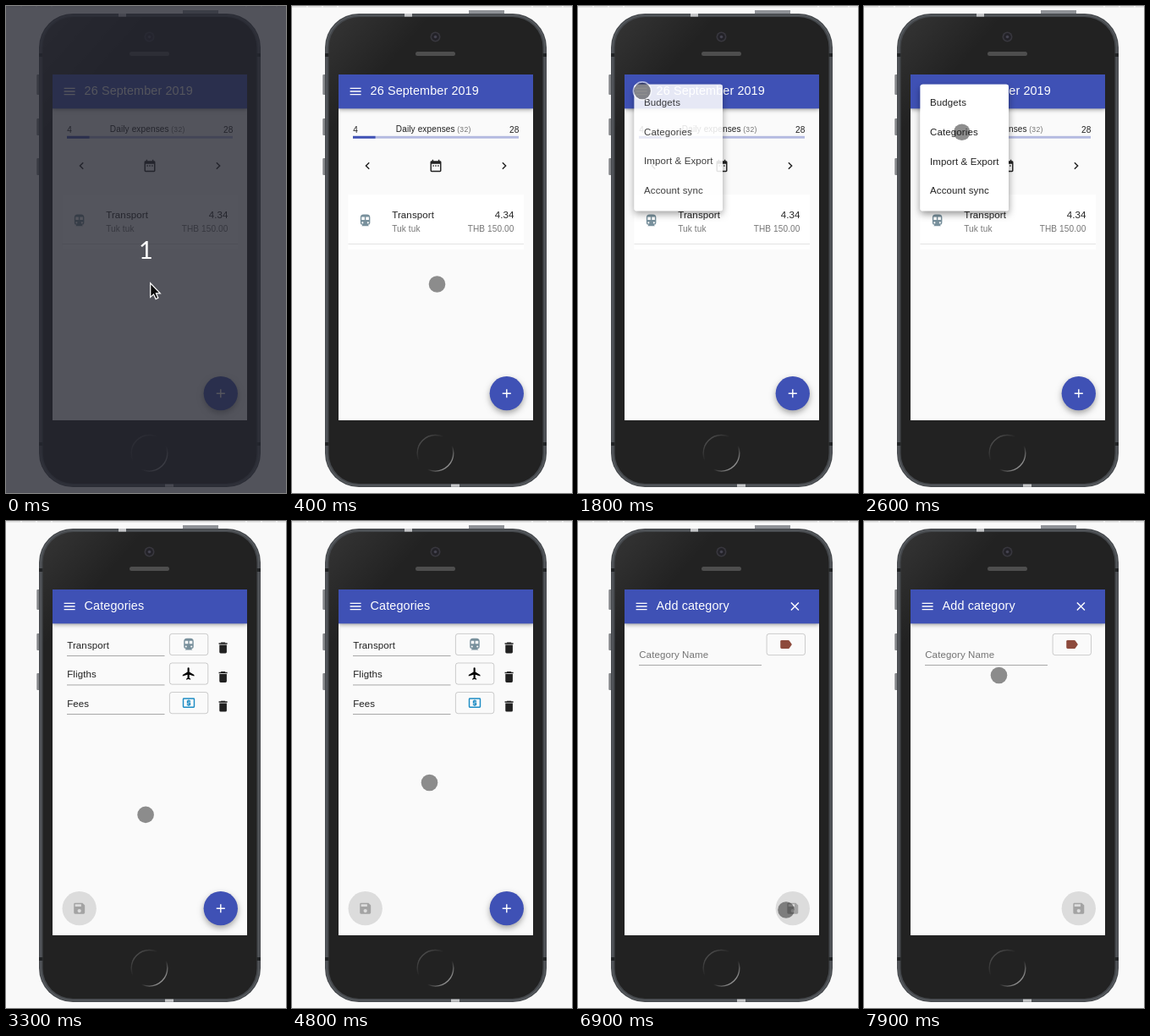
These frames come from a looping animation (331x576 px, 8 s). An HTML page with a canvas:

```html
<!DOCTYPE html>
<html lang="en">
<head>
<meta charset="utf-8">
<title>Expense app demo</title>
<style>
html, body { margin: 0; width: 100%; height: 100%; overflow: hidden; background: #f9f9f9; }
canvas { display: block; width: 331px; height: 576px; }
</style>
</head>
<body>
<canvas id="stage"></canvas>
<script>
const W = 331, H = 576, LOOP = 8000, STEP = 100;
const K = 0.72;       // app zoom on the stage
const ROW = 48 * K;   // list row pitch
const FAB = 28 * K;   // round button radius
const LEFT = 86.7, RIGHT = 253.8, BOTTOM = 458.2;
const canvas = document.getElementById('stage');
const ctx = canvas.getContext('2d');
const dpr = window.devicePixelRatio || 1;
canvas.width = W * dpr;
canvas.height = H * dpr;

const BLUE = '#3f51b5', INK = 'rgba(0,0,0,.87)', SOFT = 'rgba(0,0,0,.54)';
const FONT = '"Liberation Sans", Arial, sans-serif';

// Icons live on a 24 unit grid; line icons are stroked, the others filled.
const line = d => ({ path: new Path2D(d), stroked: true });
const solid = build => {
  const path = new Path2D();
  build(path);
  return { path };
};

const icons = {
  menu: line('M3 7h18M3 12h18M3 17h18'),
  plus: line('M5 12h14M12 5v14'),
  close: line('M5.7 5.7l12.6 12.6M18.3 5.7L5.7 18.3'),
  prev: line('M14.7 6.7L9.4 12l5.3 5.3'),
  next: line('M9.3 6.7l5.3 5.3-5.3 5.3'),
  date: solid(p => {
    p.roundRect(3, 4, 18, 18, 2);
    p.rect(5, 9, 14, 11);
    for (const x of [6, 16]) p.rect(x, 2, 2, 2);
    for (const x of [7, 11, 15]) p.rect(x, 11, 2, 2);
  }),
  tram: solid(p => {
    p.roundRect(4, 2, 16, 17, [5, 5, 3.5, 3.5]);
    for (const x of [6, 13]) p.rect(x, 6, 5, 5);
    for (const x of [7.5, 16.5]) {
      p.moveTo(x + 1.5, 15.5);
      p.arc(x, 15.5, 1.5, 0, 7);
    }
    p.addPath(new Path2D('M7.5 19h9l1.5 2H6z'));
  }),
  plane: solid(p => {
    const half = new Path2D('M11.5 2q1.5 0 1.5 1.5V9l8 5v2l-8-2.5V19l2 1.5V22l-3.5-1z');
    p.addPath(half);
    p.addPath(half, new DOMMatrix([-1, 0, 0, 1, 23, 0]));
  }),
  cash: solid(p => {
    p.roundRect(2, 4, 20, 16, 2);
    p.rect(4, 6, 16, 12);
    p.addPath(new Path2D('M11 7h2v1h2v2h-4v1h4v5h-2v1h-2v-1H9v-2h4v-1H9V8h2z'));
  }),
  trash: solid(p => {
    p.roundRect(6, 7, 12, 14, [0, 0, 2, 2]);
    p.rect(5, 4, 14, 2);
    p.rect(8.5, 3, 7, 1);
  }),
  save: solid(p => {
    p.addPath(new Path2D('M5 3h12l4 4v12q0 2-2 2H5q-2 0-2-2V5q0-2 2-2z'));
    p.rect(5, 5, 10, 4);
    p.moveTo(15, 16);
    p.arc(12, 16, 3, 0, 7);
  }),
  label: solid(p => p.addPath(new Path2D('M5 5h11q1 0 1.6.8L22 12l-4.4 6.2q-.6.8-1.6.8H5q-2 0-2-2V7q0-2 2-2z')))
};

// Touch pointer: each move starts at a time, lasts a while and ends at x, y.
const home = { x: 171.5, y: 329 };
const moves = [
  { at: 400, ms: 100, x: 97, y: 146 },
  { at: 600, ms: 400, x: 76, y: 87 },
  { at: 1100, ms: 400, x: 76, y: 100.5 },
  { at: 1900, ms: 700, x: 115.7, y: 149.3 },
  { at: 3100, ms: 300, x: 167, y: 355 },
  { at: 4700, ms: 100, x: 162.5, y: 309.5 },
  { at: 5100, ms: 200, x: 227, y: 178 },
  { at: 5700, ms: 200, x: 257, y: 186 },
  { at: 5900, ms: 300, x: 83, y: 467 },
  { at: 6300, ms: 200, x: 246, y: 460 },
  { at: 7100, ms: 100, x: 215, y: 402 },
  { at: 7300, ms: 100, x: 195.5, y: 301 },
  { at: 7600, ms: 300, x: 159.5, y: 182.5 }
];

const easeOut = p => 1 - (1 - p) ** 3;

function pointerAt(t) {
  let { x, y } = home;
  for (const m of moves) {
    if (t < m.at) break;
    const p = easeOut(Math.min(1, (t - m.at) / m.ms));
    x += (m.x - x) * p;
    y += (m.y - y) * p;
  }
  return [x, y];
}

function rect(x, y, w, h, color) {
  ctx.fillStyle = color;
  ctx.fillRect(x, y, w, h);
}

function round(x, y, w, h, r, fill, stroke, width = 1) {
  ctx.beginPath();
  ctx.roundRect(x, y, w, h, r);
  if (fill) { ctx.fillStyle = fill; ctx.fill(); }
  if (stroke) { ctx.strokeStyle = stroke; ctx.lineWidth = width; ctx.stroke(); }
}

function disc(x, y, r, fill) {
  round(x - r, y - r, 2 * r, 2 * r, r, fill);
}

function ring(x, y, r, stroke, width) {
  round(x - r, y - r, 2 * r, 2 * r, r, null, stroke, width);
}

function gradient(x0, y0, x1, y1, ...colors) {
  const g = ctx.createLinearGradient(x0, y0, x1, y1);
  colors.forEach((c, i) => g.addColorStop(i / (colors.length - 1), c));
  return g;
}

function shadowed(dy, blur, alpha, draw) {
  ctx.save();
  ctx.shadowColor = `rgba(0,0,0,${alpha})`;
  ctx.shadowOffsetY = dy * dpr;
  ctx.shadowBlur = blur * dpr;
  draw();
  ctx.restore();
}

function icon(name, x, y, color) {
  const { path, stroked } = icons[name];
  ctx.save();
  ctx.translate(x - 12 * K, y - 12 * K);
  ctx.scale(K, K);
  ctx.fillStyle = ctx.strokeStyle = color;
  ctx.lineWidth = 2;
  if (stroked) ctx.stroke(path);
  else ctx.fill(path, name === 'plane' ? 'nonzero' : 'evenodd');
  ctx.restore();
}

function text(str, x, y, size, color = INK, align = 'left') {
  const spacing = size === 12 ? 0.4 : 0.15; // px before zoom
  ctx.font = `${size * K}px ${FONT}`;
  ctx.letterSpacing = `${spacing * K}px`;
  ctx.textAlign = align;
  ctx.fillStyle = color;
  ctx.fillText(str, x, Math.round(y));
  ctx.letterSpacing = '0px';
}

function drawPhone() {
  rect(0, 0, W, H, '#f9f9f9');
  rect(0, 0, W, 1.6, '#dedede');
  for (const x of [17, 283]) {
    for (let i = 0; i < 3; i++) rect(x + i * 18, 0, 2, 1.6, '#f6f6f6');
  }

  rect(209, 5, 42, 6, '#8f9297');
  for (const [y, h] of [[81, 24], [133, 20], [180, 20]]) round(36.3, y, 4, h, 1, '#85878a');

  round(39, 9, 262, 560, 40, '#45484c');
  round(41, 11, 258, 556, 38, null, '#5a5e62', 1.2);
  rect(133, 9, 9, 3.6, '#c4c5c7');
  rect(188, 565.6, 10, 3.2, '#c4c5c7');
  for (const y of [56, 516]) {
    for (const x of [39, 296.5]) rect(x, y, 4.5, 4, '#222426');
  }
  round(43.5, 13, 253, 552, 36, '#222');
  round(43.5, 13, 253, 552, 36, gradient(48, 20, 110, 75, 'rgba(255,255,255,.08)', 'rgba(255,255,255,0)'));

  disc(169.5, 36.5, 6, '#38373e');
  disc(169.5, 36.5, 4.4, '#232228');
  disc(169.5, 36.5, 1.8, '#44434f');
  round(146, 54, 47, 5, 2.5, '#4e4e4e');
  ring(169.5, 528.8, 21.3, gradient(154, 513, 185, 545, '#4c4c4c', '#222', '#222', '#9a9a9a'), 1.4);

  rect(55, 81, 230, 409, '#fafafa');
}

function drawBar(title) {
  ctx.save();
  ctx.beginPath();
  ctx.rect(55, 81, 230, 60);
  ctx.clip();
  shadowed(2, 5, 0.4, () => rect(55, 81, 230, 56 * K, BLUE));
  ctx.restore();
  icon('menu', 75.1, 101, '#fff');
  text(title, 92.6, 105, 20, '#fff');
}

function drawAddButton() {
  shadowed(3.2, 7, 0.35, () => disc(RIGHT, BOTTOM, FAB, BLUE));
  icon('plus', RIGHT, BOTTOM, '#fff');
}

function drawSaveButton(x) {
  disc(x, BOTTOM, FAB, 'rgba(0,0,0,.12)');
  icon('save', x, BOTTOM, 'rgba(0,0,0,.26)');
}

function drawPicker(x, y, glyph, color) {
  round(x + 0.4, y + 0.4, 45.4, 25.2, 4 * K, null, 'rgba(0,0,0,.23)', 0.8);
  icon(glyph, x + 23, y + 13, color);
}

function underline(y, width) {
  rect(72, y, width, 0.8, 'rgba(0,0,0,.42)');
}

function drawHome() {
  drawBar('26 September 2019');
  text('4', 72.2, 150, 14);
  text('Daily expenses', 122.8, 149, 14);
  text('(32)', 195.2, 149, 12, SOFT);
  text('28', 268.4, 150, 14, INK, 'right');
  rect(72, 153.8, 196, 4 * K, '#b3b9e0');
  rect(72, 153.8, 196 * 4.34 / 32, 4 * K, BLUE);
  icon('prev', 89.3, 189, INK);
  icon('date', 170, 189, INK);
  icon('next', 250.8, 189, INK);

  rect(66.5, 223, 207.5, 65, '#fff');
  rect(66.5, 281, 207.5, 0.8, '#dcdcdc');
  icon('tram', 86.6, 253.8, '#78909c');
  text('Transport', 118.2, 251, 16);
  text('Tuk tuk', 118.2, 267, 14, SOFT);
  text('4.34', 262.5, 251, 16, INK, 'right');
  text('THB 150.00', 262.5, 267, 14, SOFT, 'right');
  drawAddButton();
}

function drawCategories() {
  drawBar('Categories');
  const rows = [['Transport', 'tram', '#78909c'], ['Fligths', 'plane', '#000'], ['Fees', 'cash', '#1c8cc4']];
  rows.forEach(([name, glyph, color], i) => {
    const y = 133 + i * ROW;
    text(name, 72.2, y + 17.8, 16);
    underline(y + 26, 115.5);
    drawPicker(193, y, glyph, color);
    icon('trash', 256.6, y + 17, INK);
  });
  drawSaveButton(LEFT);
  drawAddButton();
}

function drawAddForm() {
  drawBar('Add category');
  icon('close', 256.4, 101, '#fff');
  text('Category Name', 72.2, 162, 16, SOFT);
  underline(170, 145);
  drawPicker(222.7, 133, 'label', '#8d4a3c');
  drawSaveButton(RIGHT);
}

function drawMenu(alpha) {
  const box = [66.5, 92.8, 104.5, 149.5];
  ctx.save();
  ctx.globalAlpha = alpha;
  // Keep the shadow outside, so the faded sheet stays white.
  ctx.save();
  ctx.beginPath();
  ctx.rect(0, 0, W, H);
  ctx.roundRect(...box, 4 * K);
  ctx.clip('evenodd');
  shadowed(3.6, 8, 0.42, () => round(...box, 4 * K, '#fff'));
  ctx.restore();
  round(...box, 4 * K, '#fff');
  ['Budgets', 'Categories', 'Import & Export', 'Account sync'].forEach((name, i) => {
    text(name, 78, 118.4 - (1 - alpha) * 3 + i * ROW, 16);
  });
  ctx.restore();
}

function drawTouch(t) {
  const [x, y] = pointerAt(t);
  if (t >= 1700 && t < 1900) ring(x, y, 10.6, 'rgba(255,255,255,.6)', 1.6);
  disc(x, y, 9.8, 'rgba(30,30,30,.5)');
}

function drawCountdown() {
  rect(0, 0, W, H, 'rgba(36,38,48,.78)');
  ctx.font = '29px Lato, sans-serif';
  ctx.textAlign = 'center';
  ctx.fillStyle = '#fff';
  ctx.fillText('1', 165.5, 299);
  ctx.save();
  ctx.translate(170.7, 327.8);
  const arrow = new Path2D('M0 0V16.6L3.8 13.1 6.4 18.8 9.2 17.5 6.7 12H11.6Z');
  ctx.fillStyle = '#0a0a0a';
  ctx.fill(arrow);
  ctx.strokeStyle = '#fff';
  ctx.lineWidth = 1.2;
  ctx.stroke(arrow);
  ctx.restore();
}

function draw(t) {
  ctx.setTransform(dpr, 0, 0, dpr, 0, 0);
  drawPhone();
  if (t < 3200) drawHome();
  else if (t < 6700) drawCategories();
  else drawAddForm();

  if (t >= 1800 && t < 3300) drawMenu(t < 1900 ? 0.87 : t < 3200 ? 1 : 0.4);
  if (t >= 6500 && t < 6700) disc(RIGHT, BOTTOM, FAB, 'rgba(255,255,255,.2)');

  if (t < 400) drawCountdown();
  else drawTouch(t);
}

const start = performance.now();
let last = -1;
function tick() {
  const t = Math.floor(((performance.now() - start) % LOOP) / STEP) * STEP;
  if (t !== last) draw(last = t);
  requestAnimationFrame(tick);
}
tick();
</script>
</body>
</html>
```
